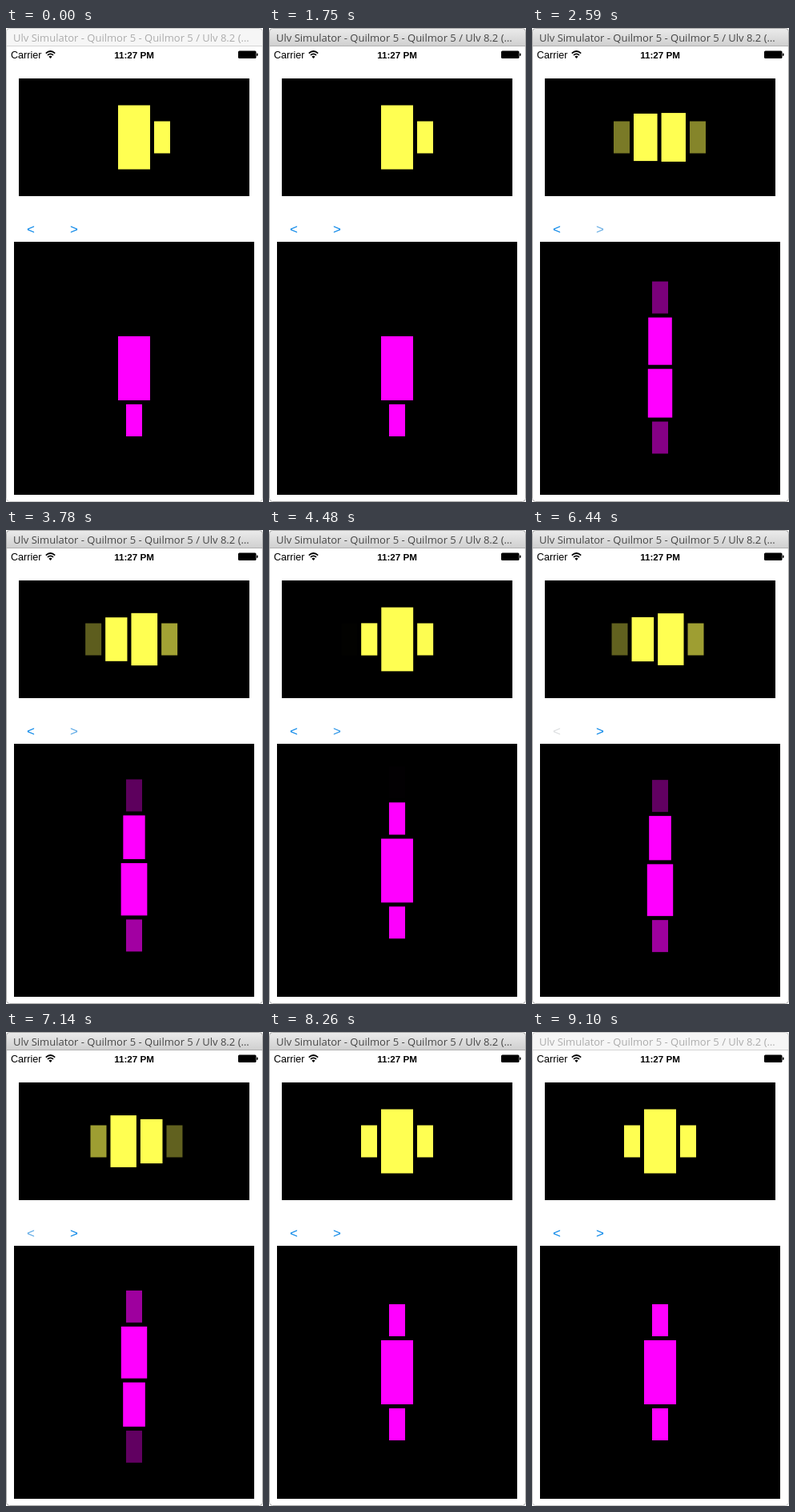
An HTML page for the animation above (9.17 s loop, 321x592 px).

```html
<!DOCTYPE html>
<html lang="en">
<head>
<meta charset="utf-8">
<title>Carousel</title>
<style>
  html, body { margin: 0; width: 100%; height: 100%; overflow: hidden; background: #fff; }
  svg { display: block; width: 100%; height: 100%; }
  .title { font: 13px "Open Sans", sans-serif; }
  .status { font: 12.6px "Liberation Sans", Arial, sans-serif; }
  .clock { font: bold 11.6px "Liberation Sans", Arial, sans-serif; }
  .button { font: 17px "Liberation Sans", Arial, sans-serif; text-anchor: middle; }
  .active .idle, svg:not(.active) .focused { display: none; }
  .frame { fill: none; stroke: #c9c9c9; }
  .active .frame { stroke: #a8a8a8; }
  .title { fill: #acacac; }
  .active .title { fill: #464646; }
</style>
</head>
<body>
<svg id="stage" viewBox="0 0 321 592">
  <defs>
    <linearGradient id="bar" x2="0" y2="1">
      <stop stop-color="#ececec"/>
      <stop offset="1" stop-color="#d0d0d0"/>
    </linearGradient>
  </defs>

  <g class="idle">
    <path d="M0 22V4Q0 0 4 0H317Q321 0 321 4V22Z" fill="#f6f6f6"/>
    <path d="M0 22.5H321" stroke="#d4d4d4"/>
  </g>
  <g class="focused">
    <path d="M0 22V4Q0 0 4 0H317Q321 0 321 4V22Z" fill="url(#bar)"/>
    <path d="M0 22.5H321" stroke="#b0b0b0"/>
  </g>
  <rect class="frame" x=".5" y=".5" width="320" height="591" rx="4"/>
  <text class="title" x="9" y="17">Ulv Simulator - Quilmor 5 - Quilmor 5 / Ulv 8.2 (…</text>

  <text class="status" x="6" y="38">Carrier</text>
  <g fill="none" stroke="#000" stroke-width="1.7">
    <path d="M49.8 31.6Q55.5 26.4 61.2 31.6M51.9 34Q55.5 30.6 59.1 34"/>
    <path d="M55.5 38L53.4 35.7Q55.5 34 57.6 35.7Z" fill="#000" stroke="none"/>
  </g>
  <text class="clock" x="160" y="38" text-anchor="middle">11:27 PM</text>
  <rect x="290" y="28.5" width="22.5" height="9.5" rx="1.5"/>
  <rect x="313" y="31.5" width="1.5" height="3.5" rx=".7"/>

  <rect x="16" y="63" width="288" height="147"/>
  <g id="row" fill="#ffff52"></g>
  <text class="button" id="back" x="31" y="256.5">&lt;</text>
  <text class="button" id="next" x="85" y="256.5">&gt;</text>
  <rect x="10" y="267" width="300" height="316"/>
  <g id="column" fill="#f0f"></g>
</svg>

<script>
const LOOP = 9170, TICK = 70, SLIDE = 300, FADE = 470, ITEMS = 8;
const FOCUS_FROM = 1750, FOCUS_TO = 9100;
const REST_COLOR = [8, 134, 232], PRESSED_COLOR = [220, 222, 224];

// Each click: direction, release time, how long it was held down.
const clicks = [
  [1, 1860, 0], [1, 2436, 0], [1, 3078, 0],
  [1, 3604, 0], [1, 4195, 0], [1, 4852, 0],
  [-1, 5930, 120], [-1, 6313, 200], [-1, 6640, 210], [-1, 6967, 200],
  [1, 7885, 115], [1, 8430, 110]
].map(([dir, release, held]) => ({ dir, release, press: release - held }));

const byId = id => document.getElementById(id);
const clamp = x => Math.min(1, Math.max(0, x));
const easeInOut = x => (1 - Math.cos(Math.PI * clamp(x))) / 2;
const easeOut = x => 1 - (1 - clamp(x)) ** 2;

function makeItems(parent) {
  return Array.from({ length: ITEMS }, () =>
    parent.appendChild(document.createElementNS("http://www.w3.org/2000/svg", "rect")));
}
const row = makeItems(byId("row"));
const column = makeItems(byId("column"));

function setRect(rect, cx, cy, width, height, opacity) {
  const attrs = { x: cx - width / 2, y: cy - height / 2, width, height, opacity };
  for (const name in attrs) rect.setAttribute(name, attrs[name]);
}

function drawItem(i, position) {
  const d = i - position, distance = Math.abs(d);
  const scale = 1 + clamp(1 - distance);
  const opacity = clamp(2 - distance);
  // Outer edges move evenly; the centre follows from the item's size.
  const offset = unit =>
    Math.sign(d) * (unit + (unit + 5) * distance - unit * scale / 2);
  setRect(row[i], 160 + offset(20), 136.5, 20 * scale, 40 * scale, opacity);
  setRect(column[i], 160, 425 + offset(40), 20 * scale, 40 * scale, opacity);
}

function drawButton(id, dir, t) {
  const last = clicks.filter(c => c.dir === dir && c.press <= t).pop();
  const rest = last ? easeOut((t - last.release) / FADE) : 1;
  const color = REST_COLOR.map((c, k) => Math.round(PRESSED_COLOR[k] + (c - PRESSED_COLOR[k]) * rest));
  byId(id).setAttribute("fill", `rgb(${color})`);
}

function draw(t) {
  byId("stage").classList.toggle("active", t >= FOCUS_FROM && t < FOCUS_TO);
  const position = clicks.reduce(
    (sum, c) => sum + c.dir * easeInOut((t - c.release) / SLIDE), 0);
  for (let i = 0; i < ITEMS; i++) drawItem(i, position);
  drawButton("back", -1, t);
  drawButton("next", 1, t);
}

const start = performance.now();
function loop() {
  const t = (performance.now() - start) % LOOP;
  draw(Math.floor(t / TICK) * TICK);
  requestAnimationFrame(loop);
}
loop();
</script>
</body>
</html>
```
